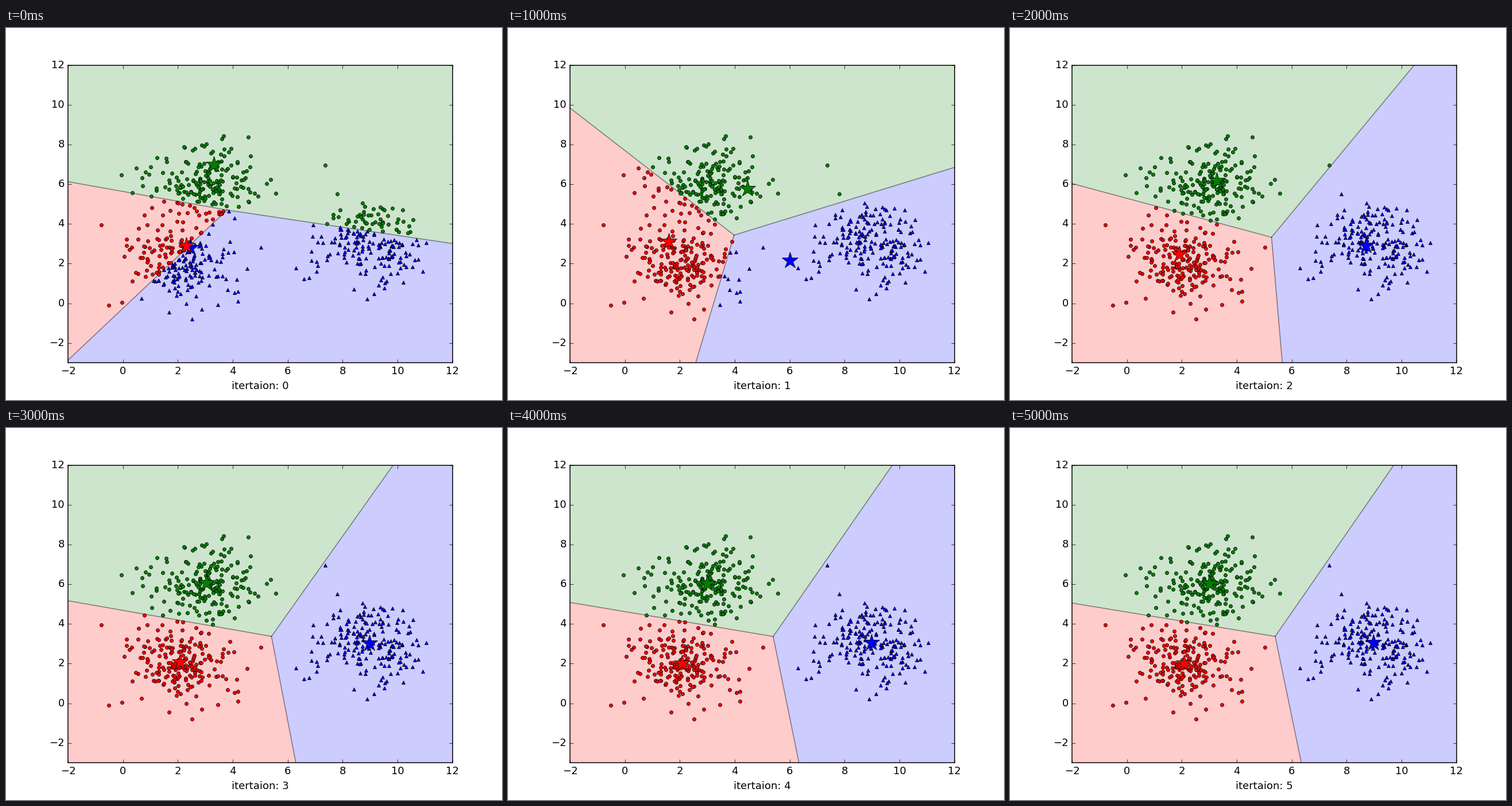
Animation of 864x648 px, one loop 6000 ms. Source, as a matplotlib script:

```python
import numpy as np
import matplotlib.pyplot as plt
from matplotlib.animation import FuncAnimation

STEPS = 6
FAR = 500
COLORS = ("b", "g", "r")
MARKERS = ("^", "o", "o")
START = np.array([[2.445, 2.789], [3.309, 6.987], [2.300, 2.900]])

plt.style.use("classic")
plt.rcParams.update({
    "font.family": "DejaVu Sans",
    "savefig.dpi": "figure",
    "figure.facecolor": "w",
})


def make_points():
    """Three unit Gaussian clouds; the one with the high outlier sits right."""
    noise = np.random.RandomState(1).randn(3, 200, 2)
    right = 1 + noise[1:].max(axis=(1, 2)).argmax()
    means = np.full((3, 2), (3.0, 6.0))
    means[0] = 2, 2
    means[right] = 9, 3
    return (noise + means[:, None]).reshape(-1, 2)


def assign(points, centers):
    gaps = points[:, None] - centers[None]
    return (gaps ** 2).sum(axis=2).argmin(axis=1)


def run_kmeans(points, centers):
    history = []
    for _ in range(STEPS):
        labels = assign(points, centers)
        history.append((centers, labels))
        centers = np.array([points[labels == k].mean(axis=0) for k in range(3)])
    return history


def unit(v):
    return v / np.hypot(*v)


def voronoi(centers):
    """Common vertex and the far end of the border opposite each centre."""
    sq = (centers ** 2).sum(axis=1)
    vertex = np.linalg.solve(2 * (centers[1:] - centers[0]), sq[1:] - sq[0])
    ends = []
    for k in range(3):
        a, b = centers[k - 2], centers[k - 1]
        dx, dy = unit(b - a)
        ray = np.array([-dy, dx])
        if ray @ (centers[k] - a) > 0:
            ray = -ray
        ends.append(vertex + FAR * ray)
    return vertex, ends


points = make_points()
history = run_kmeans(points, START)

fig = plt.figure(figsize=(8, 6), dpi=108)
ax = fig.add_axes([0.125, 0.1, 0.775, 0.8])
ax.set_xlim(-2, 12)
ax.set_ylim(-3, 12)
ax.set_xticks(range(-2, 13, 2))
ax.set_yticks(range(-2, 13, 2))
label = ax.set_xlabel("")

edge = dict(markeredgecolor="k", markeredgewidth=0.5, linestyle="none")
regions = [ax.fill([0, 1, 1], [0, 0, 1], color=c, alpha=0.2, lw=0)[0]
           for c in COLORS]
borders = [ax.plot([], [], "k-", lw=1, alpha=0.45, zorder=1.5)[0]
           for _ in COLORS]
clouds = [ax.plot([], [], color=c, marker=m, markersize=4, **edge)[0]
          for c, m in zip(COLORS, MARKERS)]
stars = [ax.plot([], [], color=c, marker="*", markersize=20, zorder=3, **edge)[0]
         for c in COLORS]


def draw(step):
    centers, labels = history[step]
    vertex, ends = voronoi(centers)
    for k in range(3):
        middle = vertex + FAR * unit(centers[k] - vertex)
        regions[k].set_xy([vertex, ends[k - 2], middle, ends[k - 1]])
        borders[k].set_data(*zip(vertex, ends[k]))
        clouds[k].set_data(*points[labels == k].T)
        stars[k].set_data(centers[k, :1], centers[k, 1:])
    label.set_text(f"itertaion: {step}")
    return regions + borders + clouds + stars + [label]


anim = FuncAnimation(fig, draw, frames=STEPS, interval=1000,
                     repeat=True, repeat_delay=0, blit=False)
plt.show()
```
